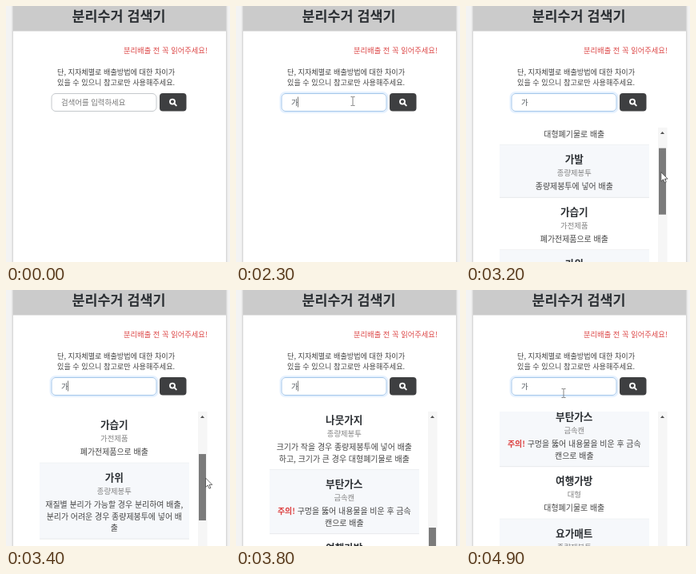
An HTML page for the animation above (5000 ms loop, 280 px wide and 320 px high).

```html
<!DOCTYPE html>
<html lang="ko">
<head>
<meta charset="utf-8">
<style>
html, body { margin: 0; width: 100%; height: 100%; overflow: hidden; background: #f3f3f3; }
svg { display: block; width: 280px; height: 320px; font-family: "Noto Sans CJK KR", "Noto Sans CJK", "Noto Sans CJK JP", sans-serif; }
.page { filter: drop-shadow(0 0 1.5px rgba(0, 0, 0, .3)); }
.bold { font-weight: 700; }
</style>
</head>
<body>
<svg viewBox="0 0 280 320">
  <defs><clipPath id="view"><rect x="42" y="152" width="198" height="168"/></clipPath></defs>
  <rect class="page" x="9" y="-10" width="266" height="340" fill="#fff"/>
  <rect x="9" width="266" height="31.5" fill="#cbcbcb"/>
  <g id="labels"></g>
  <rect id="ring" x="55.5" y="108" width="134" height="25" rx="6" fill="none" stroke="#007bff" stroke-opacity=".1" stroke-width="2"/>
  <rect id="box" x="57" y="109.5" width="131" height="22" rx="5" fill="#fff"/>
  <text id="entry" x="69" y="124" font-size="9.4"></text>
  <path id="caret" stroke="#555" stroke-width=".8"/>
  <rect x="192" y="109" width="33.5" height="22.5" rx="4" fill="#3e3f41"/>
  <g fill="none" stroke="#fff" stroke-width="1.9" stroke-linecap="round">
    <circle cx="208" cy="119.6" r="3"/><path d="M210.4 122l2.4 2.4"/>
  </g>
  <g id="list">
    <g clip-path="url(#view)"><g id="rows"></g></g>
    <rect x="240" y="152" width="11.5" height="168" fill="#f6f6f6"/>
    <path id="up" d="M243 160h5l-2.5-3z"/>
    <rect id="thumb" x="241" width="9" height="83"/>
  </g>
  <path id="arrow" d="M0 0v11.5l2.7-2.5 1.8 4.2 1.9-.8-1.8-4h3.7z" fill="#fff" stroke="#444" stroke-width=".8"/>
  <path id="beam" d="M-2.5-5.5h2l.5.5.5-.5h2M0-5V5M-2.5 5.5h2l.5-.5.5.5h2" fill="none" stroke="#777" stroke-width=".9"/>
</svg>
<script>
const $ = id => document.getElementById(id);
const LOOP = 5000, TOP = 152.5, LINE = 14.6;

function add(parent, tag, attrs, html = '') {
  const el = document.createElementNS('http://www.w3.org/2000/svg', tag);
  for (const k in attrs) el.setAttribute(k, attrs[k]);
  el.innerHTML = html;
  parent.append(el);
}

// Text whose glyphs are vertically centred on y
function label(parent, html, x, y, size, fill, more) {
  add(parent, 'text', { x, y: y + size * .37, 'font-size': size, fill, ...more }, html);
}

const mid = { 'text-anchor': 'middle' }, midBold = { ...mid, class: 'bold' };
label($('labels'), '분리수거 검색기', 141, 12.5, 17.4, '#2b2f33', midBold);
label($('labels'), '분리배출 전 꼭 읽어주세요!', 147, 55.5, 9.3, '#dc4646');
label($('labels'), '단, 지자체별로 배출방법에 대한 차이가', 64, 82.5, 9.15, '#444');
label($('labels'), '있을 수 있으니 참고로만 사용해주세요.', 64, 96, 9.15, '#444');

const BAG = '종량제봉투', BIG = '대형', bagOut = '종량제봉투에 넣어 배출', bigOut = '대형폐기물로 배출';
const items = [
  ['가구류', BIG, bigOut],
  ['가발', BAG, bagOut],
  ['가습기', '가전제품', '폐가전제품으로 배출'],
  ['가위', BAG, '재질별 분리가 가능할 경우 분리하여 배출,', '분리가 어려운 경우 종량제봉투에 넣어 배', '출'],
  ['가죽제품', BAG, bagOut],
  ['골프가방', BIG, bigOut],
  ['나뭇가지', BAG, '크기가 작을 경우 종량제봉투에 넣어 배출', '하고, 크기가 큰 경우 대형폐기물로 배출'],
  ['부탄가스', '금속캔', '<tspan class="bold" fill="#dc3c3c">주의!</tspan> 구멍을 뚫어 내용물을 비운 후 금속', '캔으로 배출'],
  ['여행가방', BIG, bigOut],
  ['요가매트', BAG, bagOut]
];
let y = TOP;
items.forEach(([name, kind, ...lines], i) => {
  const rows = $('rows'), height = 51 + LINE * lines.length;
  if (i % 2) add(rows, 'rect', { x: 42, y, width: 187, height, fill: '#f6f8fb' });
  label(rows, name, 135.3, y + 17.8, 12.6, '#2b2f33', midBold);
  label(rows, kind, 135.3, y + 34.8, 9.35, '#828282', mid);
  lines.forEach((s, n) => label(rows, s, 135.3, y + 52 + n * LINE, 9.95, '#444', mid));
  y += height;
  add(rows, 'path', { d: `M42 ${y}h187`, stroke: '#e3e5e8', 'stroke-width': .8 });
});

// Keys are [time, ...values], linear between them
function track(keys, t) {
  const i = keys.findIndex(k => k[0] > t);
  if (i === 0) return keys[0].slice(1);
  if (i < 0) return keys[keys.length - 1].slice(1);
  const a = keys[i - 1], b = keys[i], p = (t - a[0]) / (b[0] - a[0]);
  return a.slice(1).map((v, n) => v + (b[n + 1] - v) * p);
}

const pointer = [[100, 190, 137], [600, 146, 119], [2500, 146, 119], [2900, 241, 198], [3100, 241, 194],
  [3400, 249.5, 235], [3800, 255, 327], [4200, 250, 353], [4400, 225, 330], [4500, 199, 274], [4900, 122, 129]];
const scroll = [[3100, 0], [3400, 133], [3800, 431], [4200, 515]];

const show = (id, on) => $(id).setAttribute('visibility', on ? 'visible' : 'hidden');
const set = (id, name, value) => $(id).setAttribute(name, value);

function draw(now) {
  const t = Math.floor(now % LOOP / 100) * 100;
  const focus = t >= 700, typed = t >= 1500;
  show('ring', focus);
  set('box', 'stroke', focus ? '#a3c6ea' : '#c4c8cc');
  $('entry').textContent = t >= 1700 ? '가' : typed ? 'ㄱ' : '검색어를 입력하세요';
  set('entry', 'fill', typed ? '#555b61' : '#777');

  const blink = (t - 2230 + 1060 * 3) % 1060 < 530;
  show('caret', focus && (blink || typed && t < 1900));
  set('caret', 'd', `M${typed ? 77.5 : 69} 113.5v13`);

  const [s] = track(scroll, t);
  show('list', t >= 2400);
  set('rows', 'transform', `translate(0 ${-s})`);
  set('thumb', 'y', 164 + s / 3.24);
  set('thumb', 'fill', t < 2900 ? '#c1c1c1' : t < 3100 ? '#a8a8a8' : '#7b7b7b');
  set('up', 'fill', s ? '#505050' : '#a3a3a3');

  const [x, y] = track(pointer, t);
  const inField = x > 57 && x < 189 && y > 109 && y < 132;
  for (const id of ['arrow', 'beam']) {
    show(id, t >= 100 && inField === (id === 'beam'));
    set(id, 'transform', `translate(${x} ${y})`);
  }
}

const start = performance.now();
function frame() {
  draw(performance.now() - start);
  requestAnimationFrame(frame);
}
frame();
</script>
</body>
</html>
```
